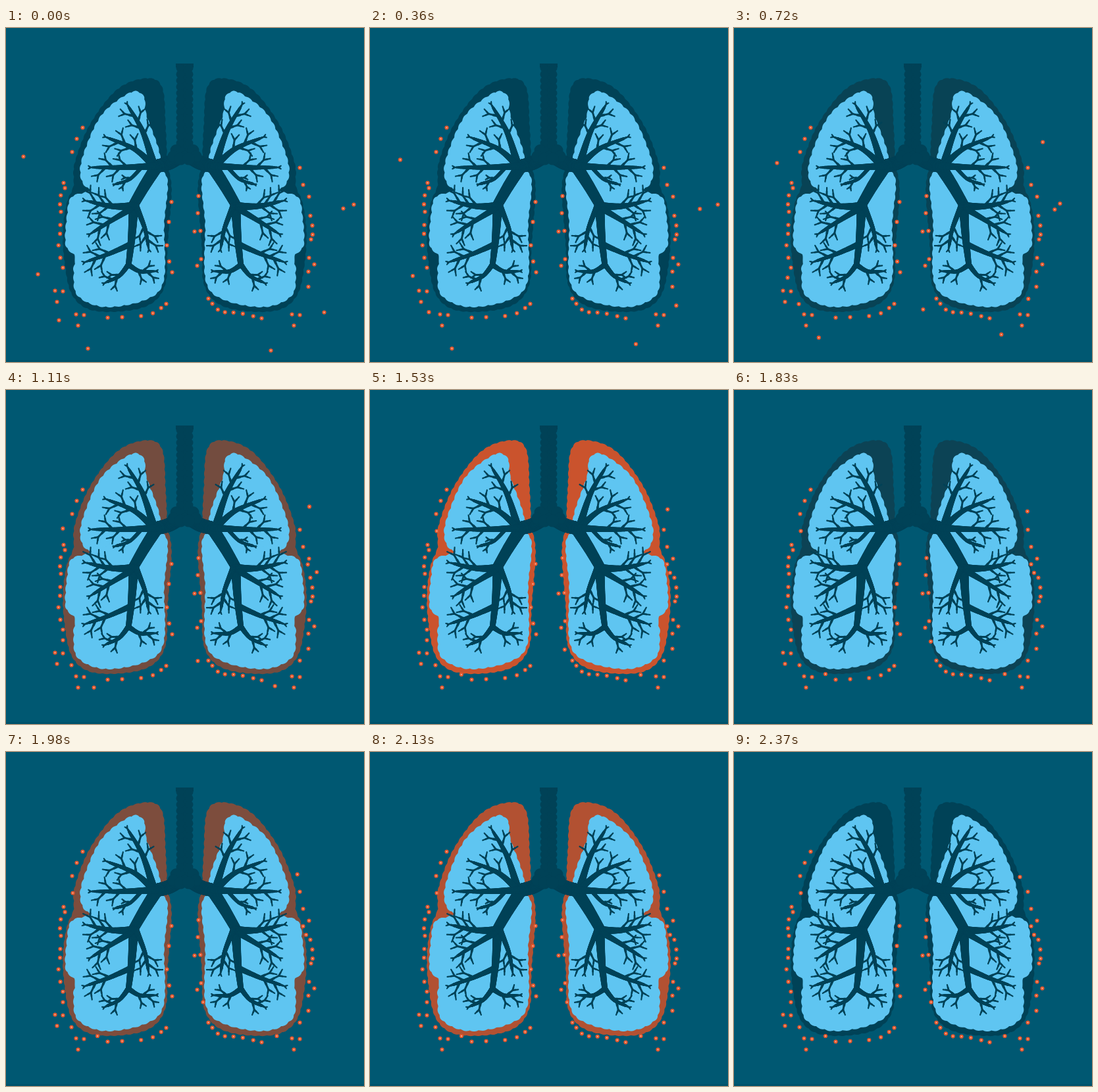
These frames come from a looping animation (544x508 px, 2740 ms). An HTML page with a canvas:

```html
<!DOCTYPE html>
<html lang="en">
<head>
<meta charset="utf-8">
<title>Lungs</title>
<style>
html, body { margin: 0; width: 100%; height: 100%; overflow: hidden; background: #005872; }
canvas { display: block; }
</style>
</head>
<body>
<canvas id="stage" width="544" height="508"></canvas>
<script>
const W = 544, H = 508, LOOP = 2740, STEP = 30, LAST = 2370;
const BG = '#005872', DARK = [0, 66, 87], HOT = [208, 84, 44], LIGHT = '#5fc5f1';
const ctx = document.getElementById('stage').getContext('2d');
const rgb = c => `rgb(${c.map(Math.round).join()})`;
const mix = (a, b, k) => a + (b - a) * k;
const mixPoint = (a, b, k) => [mix(a[0], b[0], k), mix(a[1], b[1], k)];
const clamp = k => Math.max(0, Math.min(1, k));
const parse = text => text.trim().split(/\s+/).map(p => p.split(',').map(Number));

// Catmull-Rom samples through the given points
function spline(pts, closed) {
  const n = pts.length, out = [];
  const at = i => closed ? pts[(i + n) % n] : pts[Math.max(0, Math.min(n - 1, i))];
  const spans = closed ? n : n - 1;
  for (let i = 0; i < spans; i++) {
    const [a, b, c, d] = [at(i - 1), at(i), at(i + 1), at(i + 2)];
    for (let u = 0; u < 1; u += 1 / 32) {
      out.push([0, 1].map(k => 0.5 * (2 * b[k] + (c[k] - a[k]) * u
        + (2 * a[k] - 5 * b[k] + 4 * c[k] - d[k]) * u * u
        + (3 * b[k] - a[k] - 3 * c[k] + d[k]) * u * u * u)));
    }
  }
  if (!closed) out.push(pts[n - 1]);
  return out;
}

// Closed clockwise outline whose edge is pressed inwards between round bumps
function scalloped(text, depth, size) {
  const pts = spline(parse(text), true), path = new Path2D();
  let run = 0;
  pts.forEach(([x, y], i) => {
    const [nx, ny] = pts[(i + 1) % pts.length];
    const dx = nx - x, dy = ny - y, len = Math.hypot(dx, dy) || 1;
    const dent = depth * (1 - Math.abs(Math.sin(Math.PI * run / size)));
    path.lineTo(x - dy / len * dent, y + dx / len * dent);
    run += len;
  });
  path.closePath();
  return path;
}

const pleura = scalloped(`215,76 238,91 243,150 246,205 252,247 246,330 243,388 222,419
  180,431 128,429 100,406 89,360 86,310 92,266 102,240 104,205 128,145 170,92`, 1.2, 12);
const upperLobe = scalloped(`190,97 210,104 214,132 235,196 222,232 180,255 127,246 112,220
  122,178 147,129`, 1.6, 14);
const lowerLobe = scalloped(`127,247 190,222 243,222 241,300 240,385 212,414 150,425 108,407
  102,370 104,348 90,330 92,285 99,257`, 1.6, 14);

function taper(g, pts, from, to) {
  for (let i = 1; i < pts.length; i++) {
    g.lineWidth = mix(from, to, i / (pts.length - 1));
    g.beginPath();
    g.moveTo(...pts[i - 1]);
    g.lineTo(...pts[i]);
    g.stroke();
  }
}

// A twig that forks in two at its tip
function twig(g, [x, y], angle, length, width, forks) {
  const tip = [x + Math.cos(angle) * length, y + Math.sin(angle) * length];
  taper(g, [[x, y], mixPoint([x, y], tip, 0.5), tip], width, width * 0.65);
  if (!forks) return;
  for (const side of [-1, 1]) {
    twig(g, tip, angle + side * 0.6, length * 0.65, width * 0.75, forks - 1);
  }
}

// A curved limb with twigs on alternating sides and a fork at the end
function limb(g, text, width, reach, count) {
  const pts = spline(parse(text), false), end = pts.length - 1;
  const heading = i => {
    const [a, b] = [pts[Math.max(0, i - 2)], pts[i]];
    return Math.atan2(b[1] - a[1], b[0] - a[0]);
  };
  taper(g, pts, width, 4);
  for (let n = 0; n < count; n++) {
    const i = Math.round(end * (0.45 + 0.45 * n / count));
    twig(g, pts[i], heading(i) + (n % 2 ? -0.8 : 0.8), reach, 4.5, 1);
  }
  twig(g, pts[end], heading(end), reach * 0.4, 4, 1);
}

function bronchi(g) {
  taper(g, spline(parse('266,194 248,205 230,210'), false), 22, 20);
  taper(g, spline(parse('229,211 210,241 192,272'), false), 19, 15);
  taper(g, spline(parse('194,271 191,318 186,362'), false), 15, 8);

  limb(g, '224,206 208,158 187,121', 12, 15, 4);
  limb(g, '223,208 195,184 157,168', 11, 16, 4);
  limb(g, '228,210 180,212 135,212', 12, 16, 4);
  limb(g, '205,213 188,230 168,237', 6, 9, 2);
  limb(g, '194,271 160,271 127,264', 13, 18, 5);
  limb(g, '188,276 160,293 133,310', 10, 17, 4);
  limb(g, '198,271 211,305 216,331', 9, 16, 4);
  limb(g, '187,330 155,344 126,354', 9, 17, 4);
  limb(g, '186,360 203,370 223,370', 8, 13, 3);
  limb(g, '186,360 172,377 154,386', 8, 13, 3);
}

function disc(g, x, y, r) {
  g.beginPath();
  g.arc(x, y, r, 0, 7);
  g.fill();
}

function windpipe(g) {
  g.fillRect(258, 54, 27, 6);
  g.fillRect(261, 54, 21, 140);
  for (let y = 61; y < 185; y += 9.5) {
    disc(g, 264.5, y, 6);
    disc(g, 278.5, y, 6);
  }
  for (const side of [-1, 1]) {
    disc(g, 271.5 + side * 13, 186, 9);
    disc(g, 271.5 + side * 17, 195, 9);
    disc(g, 271.5 + side * 6, 199, 9.5);
  }
}

function mirrored(g, draw) {
  draw();
  g.save();
  g.translate(543, 0);
  g.scale(-1, 1);
  draw();
  g.restore();
}

// Everything above the colour-changing outer layer never moves, so draw it once
const organ = document.createElement('canvas');
organ.width = W;
organ.height = H;
{
  const g = organ.getContext('2d');
  g.lineCap = 'round';
  mirrored(g, () => {
    g.fillStyle = LIGHT;
    g.fill(upperLobe);
    g.fill(lowerLobe);
    g.strokeStyle = rgb(DARK);
    bronchi(g);
  });
  g.fillStyle = rgb(DARK);
  windpipe(g);
}

// Particles spread evenly along a guide line, swaying from side to side
function row(count, text, sway = 0) {
  const pts = spline(parse(text), false);
  return Array.from({ length: count }, (_, i) => {
    const [x, y] = pts[Math.round((pts.length - 1) * i / (count - 1))];
    return [x + sway * Math.sin(i * 2), y];
  });
}

const settled = [
  row(3, '116,151 107,168 100,188'),
  row(5, '87,235 85,254 80,279', 3),
  row(5, '82,299 80,330 85,364', 1),
  row(3, '74,399 86,400 77,416'),
  row(3, '106,435 118,436 109,452'),
  row(6, '154,440 215,436 243,419'),
  row(5, '251,264 244,330 252,371'),
  row(4, '292,255 291,281 286,309 295,308'),
  row(2, '296,351 290,361'),
  row(8, '307,411 325,430 354,433 388,441'),
  row(3, '434,435 446,436 437,452'),
  row(3, '446,212 451,238 460,256'),
  row(4, '462,285 466,308 463,321'),
  row(4, '460,349 468,359 459,370 459,393')
].flat();

const drifters = [
  { path: '26,195 101,214', start: 0, end: 1390 },
  { path: '48,374 86,380', start: 0, end: 830 },
  { path: '80,444 99,418', start: 0, end: 760 },
  { path: '124,487 138.5,431.5', start: 370, end: 1545 },
  { path: '402,490 411,431.5', start: 120, end: 1560 },
  { path: '483,432 446,411', start: 0, end: 735 },
  { path: '528,268 451,264.5', start: 370, end: 1185 },
  { path: '512,274 455.5,277.5', start: 70, end: 1530 },
  { path: '285,435 299,380', start: 540, end: 1880, hidden: true },
  { path: '472.5,171.2 434,189.5', start: 540, end: 2370, hidden: true }
].map(d => ({ ...d, ends: parse(d.path) }));

// Three even pulses from dark to hot and back
function heat(t) {
  const phase = (t - 710) / 552;
  return phase < 0 || phase > 3 ? 0 : 1 - Math.abs(2 * (phase % 1) - 1);
}

function particle([x, y]) {
  ctx.fillStyle = '#e5572d';
  disc(ctx, x + 0.5, y + 0.5, 3.1);
  ctx.fillStyle = '#f6c3ae';
  disc(ctx, x + 0.5, y + 0.5, 1);
}

function render(t) {
  ctx.fillStyle = BG;
  ctx.fillRect(0, 0, W, H);
  ctx.fillStyle = '#00526b';
  ctx.fillRect(0, 505, W, 3);

  const k = heat(t);
  ctx.fillStyle = rgb(DARK.map((c, i) => mix(c, HOT[i], k)));
  mirrored(ctx, () => ctx.fill(pleura));
  ctx.drawImage(organ, 0, 0);

  settled.forEach(particle);
  for (const { ends, start, end, hidden } of drifters) {
    if (hidden && t < start) continue;
    particle(mixPoint(...ends, clamp((t - start) / (end - start))));
  }
}

const origin = performance.now();
function tick() {
  const t = (performance.now() - origin) % LOOP;
  render(Math.min(LAST, Math.floor(t / STEP) * STEP));
  requestAnimationFrame(tick);
}
tick();
</script>
</body>
</html>
```
